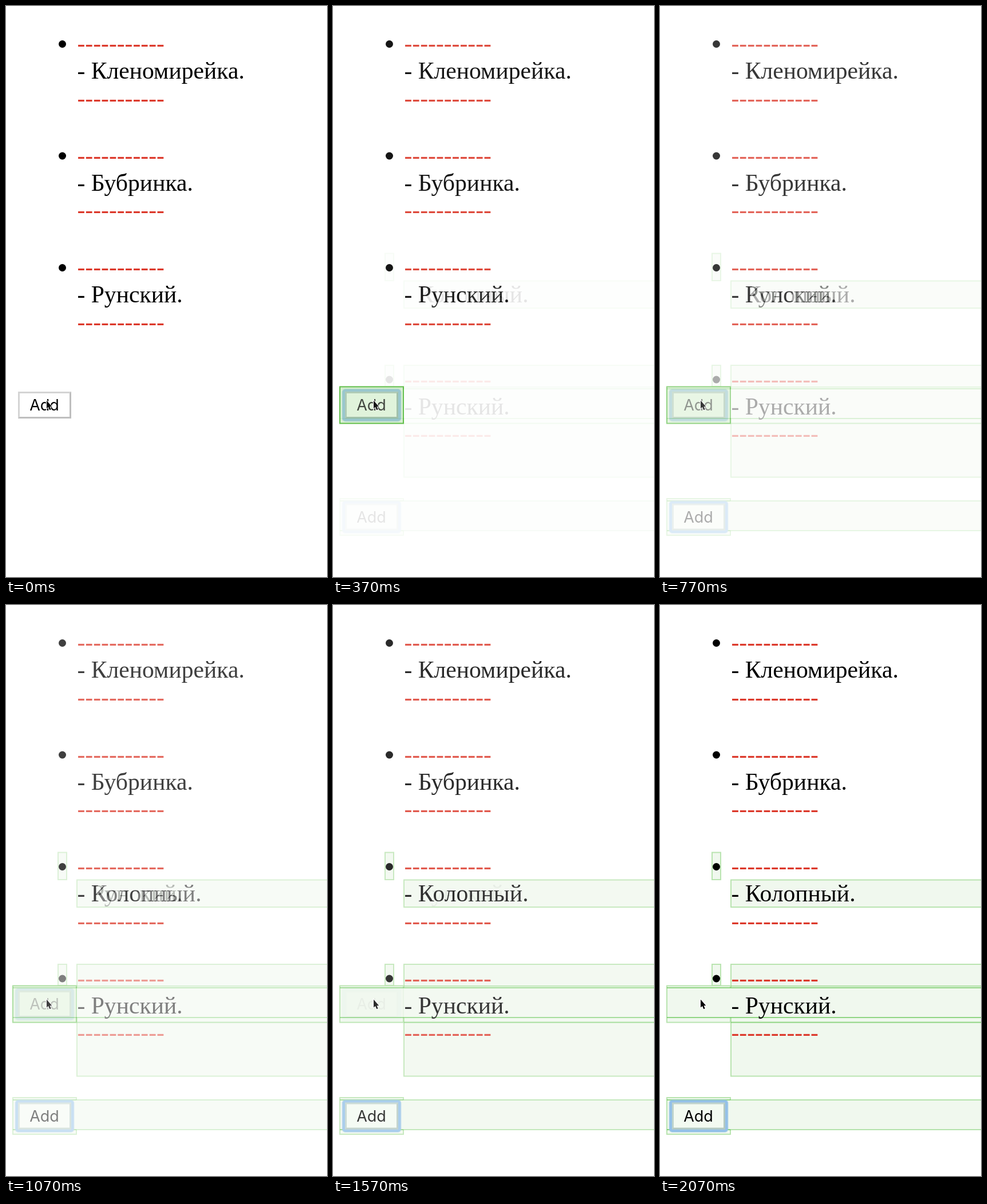
An HTML page for the animation above (2100 ms loop, 561x998 px).

```html
<!DOCTYPE html>
<html lang="ru">
<head>
<meta charset="utf-8">
<style>
html, body { margin: 0; width: 100%; height: 100%; overflow: hidden; background: #fff; }
svg { display: block; }
.item { font: 41.67px "Liberation Serif", "Times New Roman", serif; }
.dash { fill: #dc382a; }
.label { font: 27px Inter, sans-serif; text-anchor: middle; }
.box { fill: #f0f8ee; stroke: #b9e4b0; stroke-width: 2; }
.strip { fill: #f0f8ee; }
.line { fill: none; stroke: #50be3c; stroke-width: 2; }
#pressed .box { fill: #d2eecb; stroke: #44b32a; }
#pressed .label { fill: #181c16; }
</style>
</head>
<body>
<svg id="stage" width="561" height="998" viewBox="0 0 561 998"></svg>
<script>
const LOOP = 2100, STEP = 195.5;
const stage = document.getElementById('stage');

const item = (name, i) => `<g class="item" transform="translate(0 ${i * STEP})">
  <circle cx="98.5" cy="66.5" r="6.5"/>
  <text class="dash" x="124.4" y="79.4">-----------</text>
  <text x="124.4" y="127">- ${name}.</text>
  <text class="dash" x="124.4" y="174.6">-----------</text></g>`;

const list = names => names.map(item).join('');

const box = (x, y, right, bottom) =>
  `<rect class="box" x="${x}" y="${y}" width="${right - x}" height="${bottom - y}"/>`;

const strip = (y, bottom) =>
  `<rect class="strip" x="13" y="${y}" width="548" height="${bottom - y}"/>`;

const line = (x, right, y, alpha) =>
  `<path class="line" d="M${x} ${y}H${right}" opacity="${alpha}"/>`;

// Coordinates of the first button; later ones are shifted down.
const button = (dy, fill, light, dark) => `<g transform="translate(0 ${dy})">
  <rect x="21" y="674" width="93" height="47" fill="${light}"/>
  <path d="M21 721H114V674L111 677V718H24Z" fill="${dark}"/>
  <rect x="24" y="677" width="87" height="41" fill="${fill}"/>
  <text class="label" x="67" y="707">Add</text></g>`;

const ring = (dy, color) =>
  `<rect x="16.5" y="${670 + dy}" width="102" height="55.5" rx="5" fill="${color}"
    stroke="${color}" stroke-width="2" stroke-opacity=".5"/>`;

const cursor = `<path d="M71 689.5V703.5L74 701L76.3 706.3L78.7 705.2L76.5 700.2H80.3Z"
  stroke="#fff" stroke-width="2" paint-order="stroke"/>`;

const page = (id, content) =>
  `<g id="${id}"><rect width="561" height="998" fill="#fff"/>${content}${cursor}</g>`;

const firstBox = box(12, 665.5, 123, 729.5);

const pressed = `<g id="pressed">${firstBox}
  ${ring(0, '#86bcc6')}${button(0, '#dcf2d5', '#9fc0a8', '#90b49b')}</g>`;

const flashes = box(91, 432.5, 106, 480) + box(124, 480.5, 580, 528) +
  box(91, 628, 106, 665) + box(124, 628, 580, 823.5) +
  firstBox + strip(669, 721) +
  line(124, 561, 666, .4) + line(12, 561, 669, .6) +
  line(12, 561, 721, .6) + line(124, 561, 729.5, .6) +
  box(12, 861, 123, 925) + strip(865, 917) +
  line(12, 561, 865, .4) + line(12, 561, 917, .4) +
  line(12, 123, 865, .3) + line(12, 123, 917, .4);

stage.innerHTML =
  page('before', list(['Кленомирейка', 'Бубринка', 'Рунский']) +
    button(0, '#fff', '#d4d4d4', '#bebebe') + pressed) +
  page('after', flashes + list(['Кленомирейка', 'Бубринка', 'Колопный', 'Рунский']) +
    ring(STEP, '#94c1e8') + button(STEP, '#f3faf1', '#bfd3cc', '#b4c9c1'));

const fade = (id, value) => document.getElementById(id).setAttribute('opacity', value);

// The picture advances in 100 ms steps after a short first one.
const stepStart = t => t < 130 ? 0 : t < 170 ? 130 : Math.floor((t - 70) / 100) * 100 + 70;

function draw(now) {
  const t = stepStart(now % LOOP);
  const p = Math.min(1, Math.max(0, (t - 200) / 1750));
  fade('before', 1 - p);
  fade('after', p);
  fade('pressed', t < 130 ? 0 : t < 170 ? .5 : 1);
}

const start = performance.now();
function tick() {
  draw(performance.now() - start);
  requestAnimationFrame(tick);
}
tick();
</script>
</body>
</html>
```
